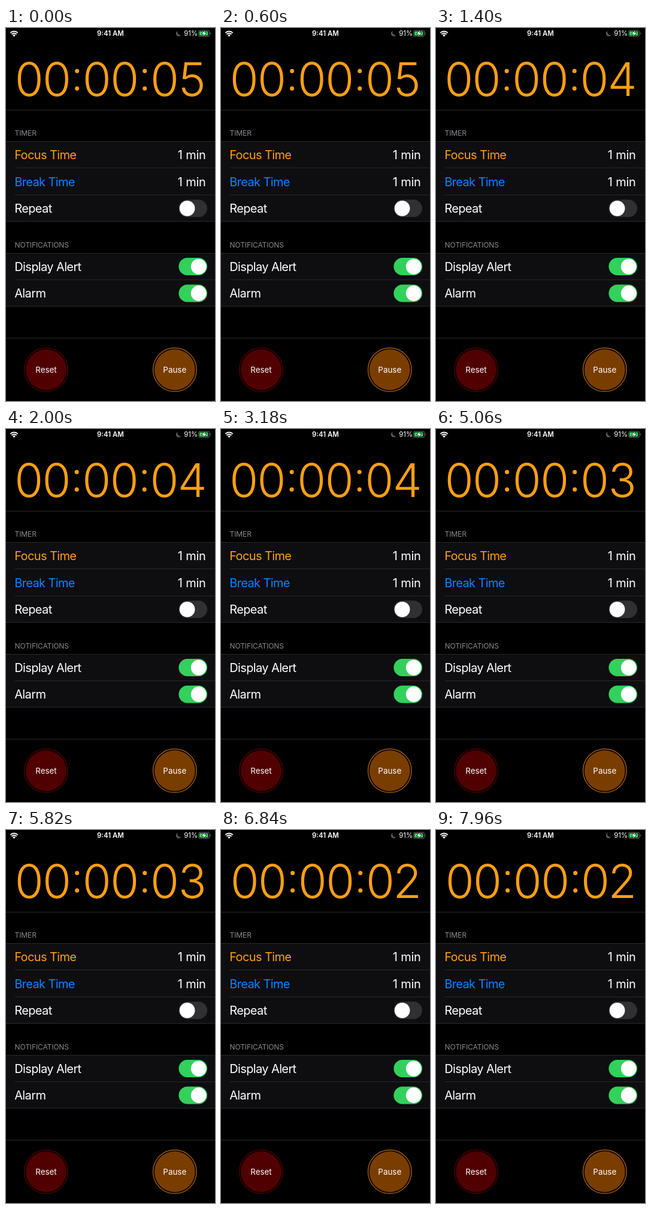
Recreate the animation shown at these times as an HTML page. Size 349 px wide and 620 px high, loop 8 s.

```html
<!DOCTYPE html>
<html lang="en">
<head>
<meta charset="utf-8">
<title>Focus timer</title>
<style>
  html, body { margin: 0; width: 100%; height: 100%; overflow: hidden; background: #000; }
  svg { display: block; width: 349px; height: 620px; font-family: Inter, Roboto, sans-serif; fill: #fff; }
  .clock { font-size: 77.5px; font-weight: 300; text-anchor: middle; fill: #ff9f14; }
  .row { font-size: 20px; letter-spacing: -0.62px; }
  .value { letter-spacing: -0.4px; word-spacing: 0.6px; }
  .head { font-size: 12px; letter-spacing: -0.12px; fill: #8b8b90; }
  .status { font-size: 11.4px; }
  .btn { font-size: 13.4px; text-anchor: middle; }
</style>
</head>
<body>
<svg id="stage" viewBox="0 0 349 620">
  <rect width="349" height="620" fill="#000"/>

  <g fill="none" stroke="#fff" stroke-width="1.9">
    <path d="M7.3 8.2A8.6 8.6 0 0 1 19.7 8.2"/>
    <path d="M9.5 10.5A5.5 5.5 0 0 1 17.5 10.5"/>
  </g>
  <path d="M11.2 12A3.2 3.2 0 0 1 15.8 12L13.5 14.4Z"/>
  <text class="status" x="174.4" y="13.4" font-weight="600" text-anchor="middle">9:41 AM</text>
  <path d="M286.6 5A4.6 4.6 0 1 0 292.4 11.4A4.7 4.7 0 0 1 286.6 5Z" fill="#58585c"/>
  <text class="status" x="297.2" y="13.4">91%</text>
  <rect x="321.4" y="4" width="18.4" height="10" rx="2.6" fill="none" stroke="#77777b" stroke-width=".9"/>
  <rect x="322.9" y="5.5" width="14.6" height="7" rx="1.3" fill="#30d158"/>
  <path d="M340.8 7.3a1.8 1.8 0 0 1 0 3.4Z" fill="#77777b"/>
  <path d="M332.6 3.8L327 9.8H330.3L328.8 14.2L334.6 8.1H331.2Z" stroke="#000" stroke-width="1.1" paint-order="stroke"/>

  <g id="clock" class="clock"></g>
  <g id="list"></g>
  <g id="buttons"></g>
</svg>
<script>
const LOOP = 8000;
const ORANGE = '#ff9f14', BLUE = '#0a84ff', WHITE = '#fff';
const LINE = '#29292c', CELL = '#0e0d10';

function add(parent, tag, attrs, text) {
  const el = document.createElementNS('http://www.w3.org/2000/svg', tag);
  for (const key in attrs) el.setAttribute(key, attrs[key]);
  if (text) el.textContent = text;
  parent.appendChild(el);
  return el;
}

const byId = id => document.getElementById(id);
const clock = byId('clock'), list = byId('list'), buttons = byId('buttons');

function rule(y, x = 0) {
  add(list, 'rect', { x, y: Math.floor(y), width: 349 - x, height: 1, fill: LINE });
}

function section(title, titleY, top, rows) {
  const step = 44.4, end = top + step * rows.length;
  add(list, 'text', { class: 'head', x: 14.6, y: titleY }, title);
  add(list, 'rect', { x: 0, y: Math.floor(top), width: 349, height: Math.floor(end) - Math.floor(top), fill: CELL });
  rows.forEach(([label, value, color], i) => {
    const y = top + step * i;
    rule(y, i ? 15 : 0);
    add(list, 'text', { class: 'row', x: 14.2, y: y + 30, fill: color || WHITE }, label);
    if (typeof value === 'string') add(list, 'text', { class: 'row value', x: 286.8, y: y + 30 }, value);
    else toggle(y + 22.6, value);
  });
  rule(end);
}

function toggle(y, on) {
  add(list, 'rect', { x: 288.4, y: y - 14.5, width: 47.6, height: 29, rx: 14.5, fill: on ? '#32d15b' : '#303033' });
  add(list, 'circle', { cx: on ? 321.7 : 302.6, cy: y, r: 12.9 });
}

function button(x, label, fill, ring) {
  add(buttons, 'circle', { cx: x, cy: 568, r: 36.3, fill: 'none', stroke: ring, 'stroke-width': 1.5 });
  add(buttons, 'circle', { cx: x, cy: 568, r: 33.9, fill });
  add(buttons, 'text', { class: 'btn', x, y: 573 }, label);
}

rule(136);
section('TIMER', 178.8, 188.4, [
  ['Focus Time', '1 min', ORANGE],
  ['Break Time', '1 min', BLUE],
  ['Repeat', false]
]);
section('NOTIFICATIONS', 364.8, 374, [['Display Alert', true], ['Alarm', true]]);
rule(515);
button(67, 'Reset', '#500000', '#4a0000');
button(281.8, 'Pause', '#7a3d00', '#9c5a0e');

// The leading digits drift slightly as the last digit changes width.
const lead = add(clock, 'g', {});
for (const x of [38.7, 85, 151.8, 198.1, 264.9]) add(lead, 'text', { x, y: 113 }, '0');
for (const cx of [118.6, 231.7])
  for (const cy of [71.6, 100.6]) add(lead, 'circle', { cx, cy, r: 3.5 });
const last = add(clock, 'text', { x: 311.2, y: 113 }, '5');

const FIRST_TICK = 1240, TICK = 2440;
const drift = { 5: 0, 4: -0.5, 3: 0, 2: 1 };
let shown = 5;

function draw(t) {
  const digit = 5 - Math.max(0, Math.floor((t - FIRST_TICK) / TICK) + 1);
  if (digit === shown) return;
  shown = digit;
  last.textContent = digit;
  lead.setAttribute('transform', `translate(${drift[digit]} 0)`);
}

const start = performance.now();
function frame() {
  draw((performance.now() - start) % LOOP);
  requestAnimationFrame(frame);
}
draw(0);
frame();
</script>
</body>
</html>
```
